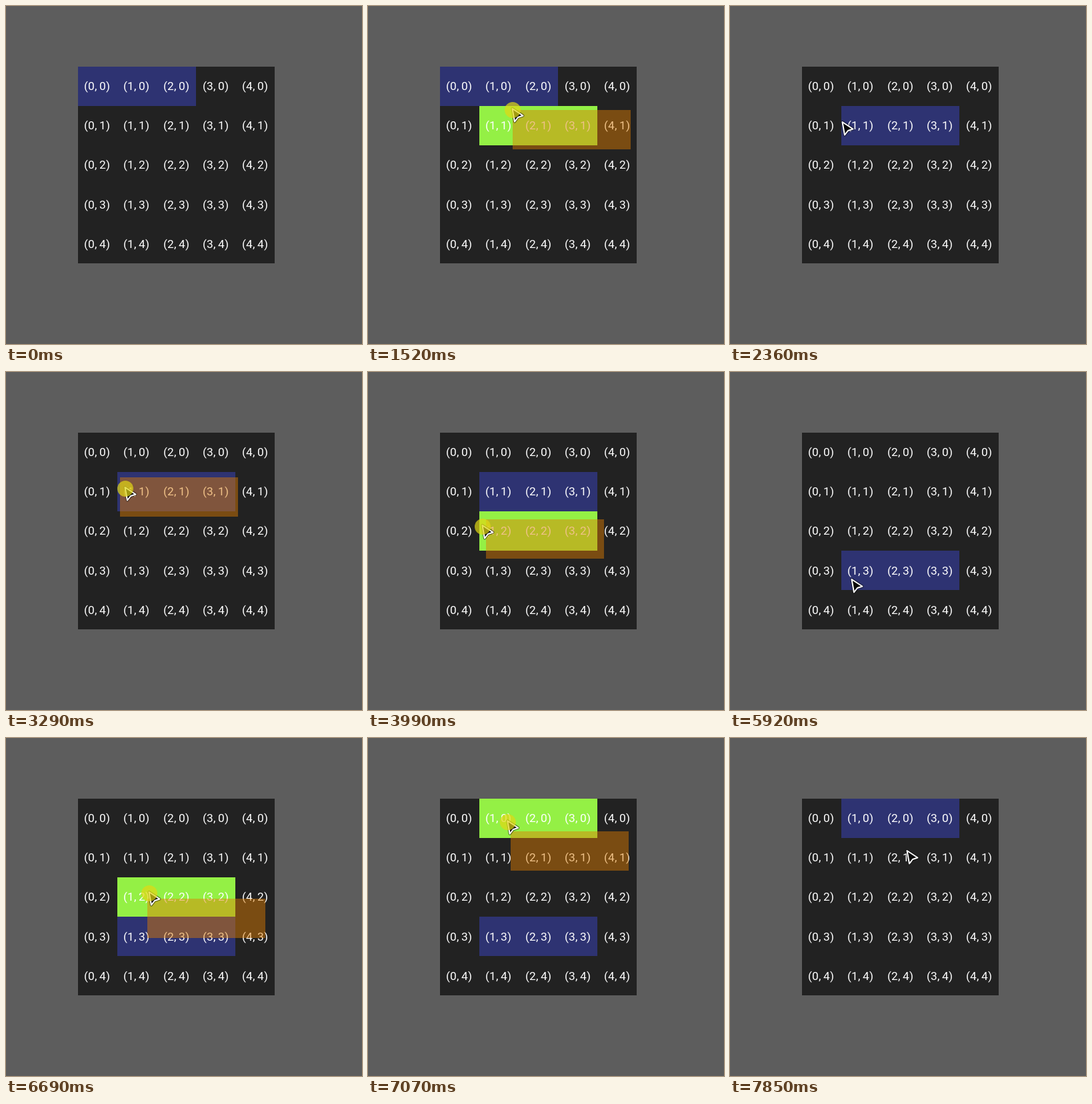
An HTML page with a canvas for the animation above (8400 ms loop, 534 by 507 pixels).

```html
<!DOCTYPE html>
<html lang="en">
<head>
<meta charset="utf-8">
<title>Grid drag and drop</title>
<style>
  html, body { margin: 0; width: 100%; height: 100%; overflow: hidden; background: #5d5d5d; }
  canvas { display: block; }
</style>
</head>
<body>
<canvas id="stage" width="534" height="507"></canvas>
<script>
const ctx = document.getElementById('stage').getContext('2d');

const LOOP = 8400;
const START = 430;   // pointer enters
const TICK = 77.1;   // pointer sampling interval, ms
const CELL = 59, LEFT = 108, TOP = 91, COUNT = 5;
const ITEM_W = 3 * CELL;
const LABEL_STEP = 59.25;

// Eased pointer moves: the pointer rests between them
const entry = { x: 509, y: 143 };
const moves = [
  { from: 0, to: 9, x: 160, y: 117 },
  { from: 11, to: 13, x: 217, y: 156 },
  { from: 14, to: 19, x: 169, y: 176 },
  { from: 28, to: 33, x: 163, y: 163 },
  { from: 33, to: 36, x: 171, y: 158 },
  { from: 36, to: 37, x: 179, y: 175 },
  { from: 37, to: 40, x: 182, y: 210 },
  { from: 44, to: 46, x: 172, y: 232 },
  { from: 52, to: 58, x: 252, y: 235 },
  { from: 58, to: 60, x: 248, y: 223 },
  { from: 60, to: 62, x: 235, y: 310 },
  { from: 62, to: 66, x: 183, y: 313 },
  { from: 76, to: 81, x: 215, y: 233 },
  { from: 81, to: 83, x: 219, y: 160 },
  { from: 83, to: 87, x: 208, y: 120 },
  { from: 92, to: 96, x: 266, y: 171 }
];

// Button down, ghost appears, button up (in ticks)
const drags = [
  { press: 9, show: 14, drop: 25 },
  { press: 33, show: 36, drop: 51 },
  { press: 59, show: 63, drop: 71 },
  { press: 76, show: 80, drop: 91 }
];

const smooth = u => u * u * (3 - 2 * u);

function pointerAt(tick) {
  let { x, y } = entry;
  for (const m of moves) {
    if (tick <= m.from) break;
    const s = smooth(Math.min(1, (tick - m.from) / (m.to - m.from)));
    x += (m.x - x) * s;
    y += (m.y - y) * s;
  }
  return { x, y };
}

function cellAt({ x, y }) {
  return { col: Math.floor((x - LEFT) / CELL), row: Math.floor((y - TOP) / CELL) };
}

function box(x, y, w, h, color) {
  ctx.fillStyle = color;
  ctx.fillRect(x, y, w, h);
}

function itemBox({ col, row }, color) {
  box(LEFT + col * CELL, TOP + row * CELL, ITEM_W, CELL, color);
}

// Glyphs sit on whole pixels
function drawLabel(text, x, y) {
  for (const glyph of text) {
    ctx.fillText(glyph, x, y);
    x += Math.round(ctx.measureText(glyph).width);
  }
}

function drawLabels() {
  ctx.font = '17.33px Roboto, sans-serif';
  ctx.fillStyle = '#fff';
  for (let row = 0; row < COUNT; row++) {
    for (let col = 0; col < COUNT; col++) {
      const x = Math.round(117 + col * LABEL_STEP);
      const y = Math.round(125.9 + row * LABEL_STEP);
      drawLabel(`(${col}, ${row})`, x, y);
    }
  }
}

function drawPointer({ x, y }, pressed) {
  ctx.save();
  ctx.translate(x - 0.5, y - 2);
  ctx.lineJoin = 'round';
  ctx.beginPath();
  ctx.moveTo(0, 0);
  ctx.lineTo(16, 10.5);
  ctx.lineTo(8.5, 13);
  ctx.lineTo(3.5, 19.5);
  ctx.closePath();
  ctx.strokeStyle = 'rgba(0, 0, 0, 0.5)';
  ctx.lineWidth = 4;
  ctx.stroke();
  ctx.fillStyle = '#0a0a0a';
  ctx.fill();
  ctx.strokeStyle = '#fff';
  ctx.lineWidth = 2;
  ctx.stroke();
  ctx.restore();
  if (!pressed) return;
  ctx.beginPath();
  ctx.arc(x, y, 12, 0, Math.PI * 2);
  ctx.fillStyle = 'rgba(225, 215, 20, 0.7)';
  ctx.fill();
}

function draw(ms) {
  const tick = Math.floor((ms - START) / TICK);
  const landed = drags.filter(d => tick >= d.drop).pop();
  const item = landed ? cellAt(pointerAt(landed.drop)) : { col: 0, row: 0 };
  const drag = drags.find(d => tick >= d.press && tick < d.drop);
  const ghost = drag && tick >= drag.show && pointerAt(tick - 1);   // trails by one tick

  box(0, 0, 534, 507, '#5d5d5d');
  box(LEFT, TOP, COUNT * CELL, COUNT * CELL, '#222');
  if (ghost) itemBox(cellAt(ghost), '#94f045');
  itemBox(item, '#2e3372');
  drawLabels();
  if (ghost) {
    box(Math.round(ghost.x), Math.round(ghost.y), ITEM_W, CELL, 'rgba(221, 123, 2, 0.47)');
  }
  if (tick >= 0) drawPointer(pointerAt(tick), Boolean(drag));
}

const began = performance.now();
function loop() {
  draw((performance.now() - began) % LOOP);
  requestAnimationFrame(loop);
}
loop();
</script>
</body>
</html>
```
